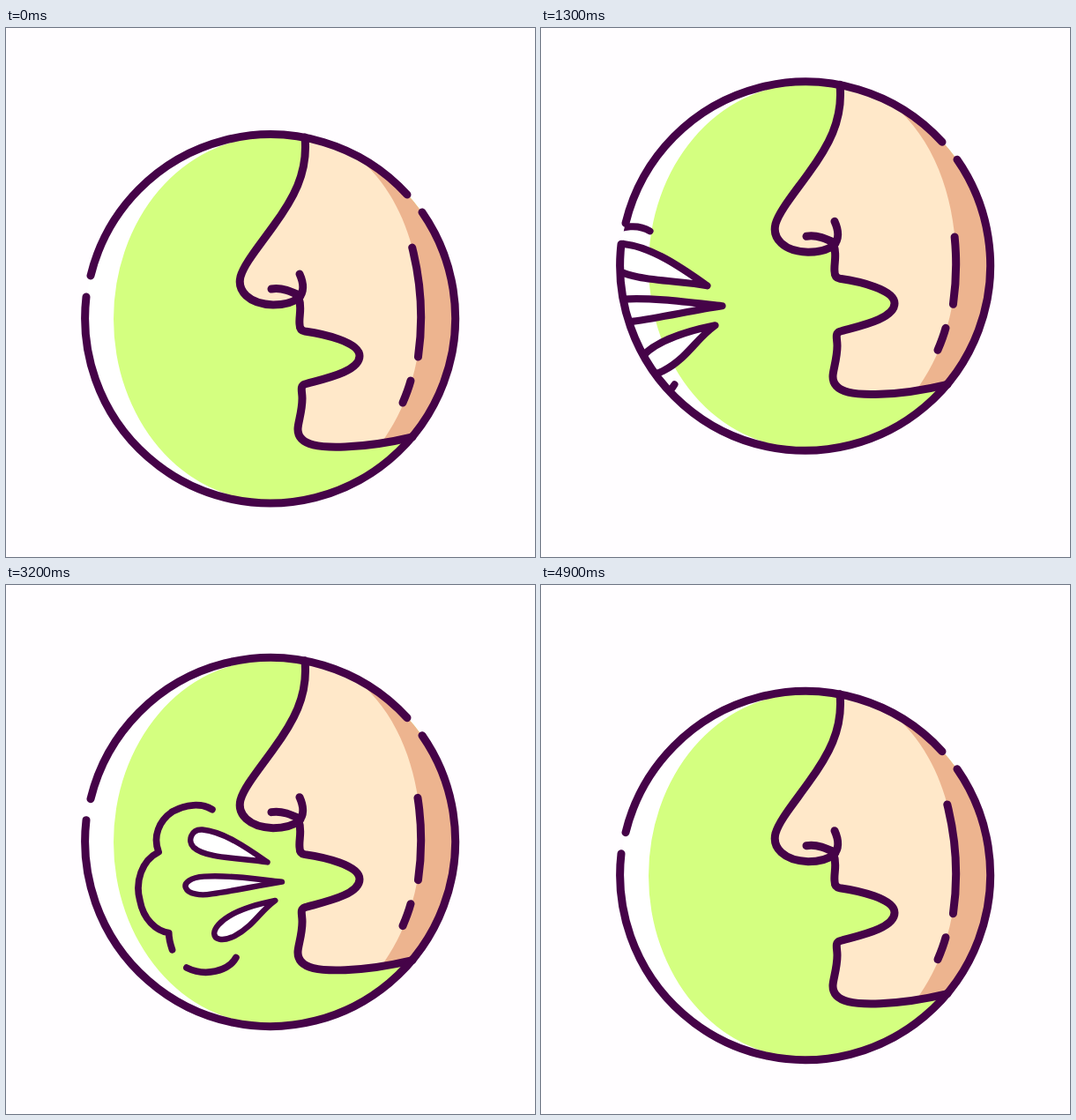
An HTML page that plays this animation: 600x600 px, repeating every 5 s.

```html
<!DOCTYPE html>
<html>
<head>
<meta charset="utf-8">
<style>
  html, body { margin: 0; height: 100%; overflow: hidden; background: #fffdff; }
  svg { display: block; width: 100%; height: 100%; }
  .line { fill: none; stroke: #450348; stroke-width: 9; stroke-linecap: round; stroke-linejoin: round; }
  #cough { stroke-width: 8; }
  .drop { fill: #fff; stroke-width: 7.5; }
</style>
</head>
<body>
<svg viewBox="0 0 600 600">
  <defs>
    <clipPath id="disc"><circle cx="300" cy="330" r="210"/></clipPath>
    <clipPath id="face"><path id="faceArea"/></clipPath>
  </defs>
  <g id="scene">
    <g clip-path="url(#disc)">
      <circle cx="300" cy="330" r="210" fill="#fff"/>
      <path d="M297 124A175 206 0 0 0 297 536V545H520V115H297Z" fill="#d4ff80"/>
      <g id="cough" class="line">
        <path d="M216 243C203 235 185 237 170 245C153 256 146 275 153 293C133 303 125 328 131 350C135 372 150 386 165 388C165 396 167 402 169 408M186 429C208 440 235 433 244 417"/>
        <path class="drop" data-tip="281 305" d="M281 305C258 289 225 265 195 262C180 261 175 277 183 285C200 301 250 299 281 305Z"/>
        <path class="drop" data-tip="298 328" d="M298 328C262 324 225 319 195 321C177 322 168 330 171 336C174 344 190 347 205 344C235 340 265 333 298 328Z"/>
        <path class="drop" data-tip="290 350" d="M290 350C265 355 230 365 215 382C207 391 208 399 216 401C228 404 245 393 256 383C268 372 275 361 290 350Z"/>
      </g>
      <g clip-path="url(#face)">
        <path d="M200 90H520V500H200Z" fill="#edb48f"/>
        <path d="M398 146C448 187 470 255 471 325C470 385 454 432 424 473L200 500V90H380Z" fill="#ffe8c9"/>
      </g>
    </g>
    <g class="line">
      <path id="profile" d="M339 124C343 165 325 195 303 225C285 250 270 268 266 282C262 298 275 313 303 314C315 314 326 311 332 306C336 317 332 327 333 336Q333 343 339 344C360 347 401 356 401 372C401 390 360 398 339 404C333 406 336 412 336 420C336 435 331 448 331 455C331 475 360 476 385 475C415 474 440 469 461 464"/>
      <path d="M301 296C313 294 324 299 334 304M333 279C338 290 338 300 332 306M459 400Q456 411 450 425"/>
      <path id="cheek"/>
      <path d="M96 281A210 210 0 0 1 455 189M472 209A210 210 0 1 1 91 305"/>
    </g>
  </g>
</svg>
<script>
  const $ = id => document.getElementById(id);
  const drops = [...document.querySelectorAll('.drop')];
  $('faceArea').setAttribute('d', $('profile').getAttribute('d') + 'H520V90H339Z');

  // Smooth S-curve from 0 to 1
  const ease = u => {
    u = Math.min(1, Math.max(0, u));
    const a = u ** 1.7;
    return a / (a + (1 - u) ** 1.7);
  };

  // Dash along the cheek, from y1 to y2 measured from the disc's centre
  function cheek(y1, y2) {
    const k = 0.0016, x = y => 470.7 - k * (y + 2) ** 2, mid = (y1 + y2) / 2;
    const cx = x(y1) - 2 * k * (y1 + 2) * (mid - y1);
    return `M${x(y1)} ${330 + y1}Q${cx} ${330 + mid} ${x(y2)} ${330 + y2}`;
  }

  function draw(ms) {
    const t = Math.floor(ms / 100) * 100 % 2500;
    const lift = 60 * (ease(t / 1200) - ease((t - 1250) / 1200));
    $('scene').setAttribute('transform', `translate(0 ${-lift})`);
    $('cheek').setAttribute('d', cheek(-81 + 0.8 * lift, 43));

    const x = 363 - 276 * ease(t / 2400);
    $('cough').setAttribute('transform',
      `translate(${x} 375) scale(${ease(t / 800)}) translate(-298 -328)`);
    const size = 1.1 * ease(t / 1000);
    for (const d of drops) {
      const [tx, ty] = d.dataset.tip.split(' ');
      d.setAttribute('transform',
        `translate(${tx} ${ty}) scale(${size}) translate(${-tx} ${-ty})`);
    }
  }

  let start;
  function tick(now) {
    start ??= now;
    draw(now - start);
    requestAnimationFrame(tick);
  }
  draw(0);
  requestAnimationFrame(tick);
</script>
</body>
</html>
```
